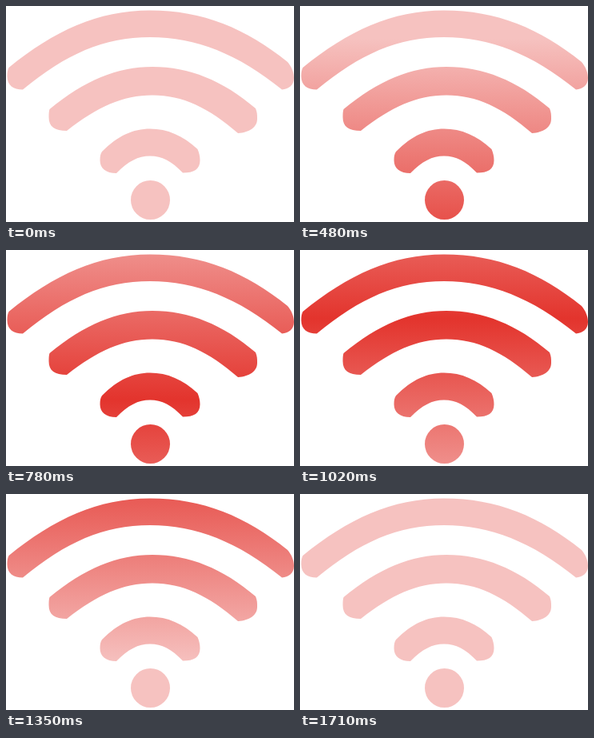
These frames come from a looping animation (360 by 270 pixels, 1.8 s). An HTML page:

```html
<!DOCTYPE html>
<html lang="en">
<head>
<meta charset="utf-8">
<title>Signal pulse</title>
<style>
  html, body { margin: 0; width: 100%; height: 100%; overflow: hidden; background: #fff; }
  svg { display: block; width: 100%; height: 100%; }
</style>
</head>
<body>
<svg viewBox="0 0 360 270">
  <defs>
    <linearGradient id="glow" gradientUnits="userSpaceOnUse" x1="0" x2="0">
      <stop offset="0" stop-color="#f6c2c0"/>
      <stop offset=".5" stop-color="#e3342d"/>
      <stop offset="1" stop-color="#f6c2c0"/>
    </linearGradient>
  </defs>
  <g fill="url(#glow)">
    <path d="M3.5 77C60 31 115 5.5 180 5.5C246 5.5 300 28 352 70C357 76 360 83 360 90C360 99 353 104 345 104.5C290 60 238 39 180 39C122 39 75 60 21 104.5C9 104.500 1.500 99 1.500 88C1.500 83 2 80 3.500 77Z"/>
    <path d="M54.500 129C98 93 139 76 183 76C229 76 271 93 312 128C314 133 314 136 314 141C314 152 304 158 290 159C253 127 221 111.500 183 111.500C146 111.500 114 126 76 156C61 156 53.500 151 53.500 139C53.500 135 53.500 132 54.500 129Z"/>
    <path d="M120 182C140 162 159 153.500 180 153.500C202 153.500 221 162 239.500 179C241.500 184 242.500 188 242.500 193C242.500 204 235 208.500 221 208.500C207 194 195 187.500 180 187.500C165 187.500 153 194 138 209C125 209 117.500 203 117.500 193C117.500 188 118 185 120 182Z"/>
    <circle cx="180.500" cy="242.500" r="24.500"/>
  </g>
</svg>
<script>
const LOOP = 1800;
const REACH = 285;
// [time in ms, height of the brightest line]
const path = [[0, 552], [480, 326], [780, 187], [1020, 86], [1230, -4], [1470, -138], [1710, -285], [LOOP, -290]];
const glow = document.getElementById('glow');

function peakAt(t) {
  const i = path.findIndex(([end]) => t < end);
  const [t0, y0] = path[i - 1];
  const [t1, y1] = path[i];
  return y0 + (y1 - y0) * (t - t0) / (t1 - t0);
}

function draw(t) {
  const y = peakAt(t);
  glow.setAttribute('y1', y - REACH);
  glow.setAttribute('y2', y + REACH);
}

const start = performance.now();
function tick() {
  draw((performance.now() - start) % LOOP);
  requestAnimationFrame(tick);
}
tick();
</script>
</body>
</html>
```
